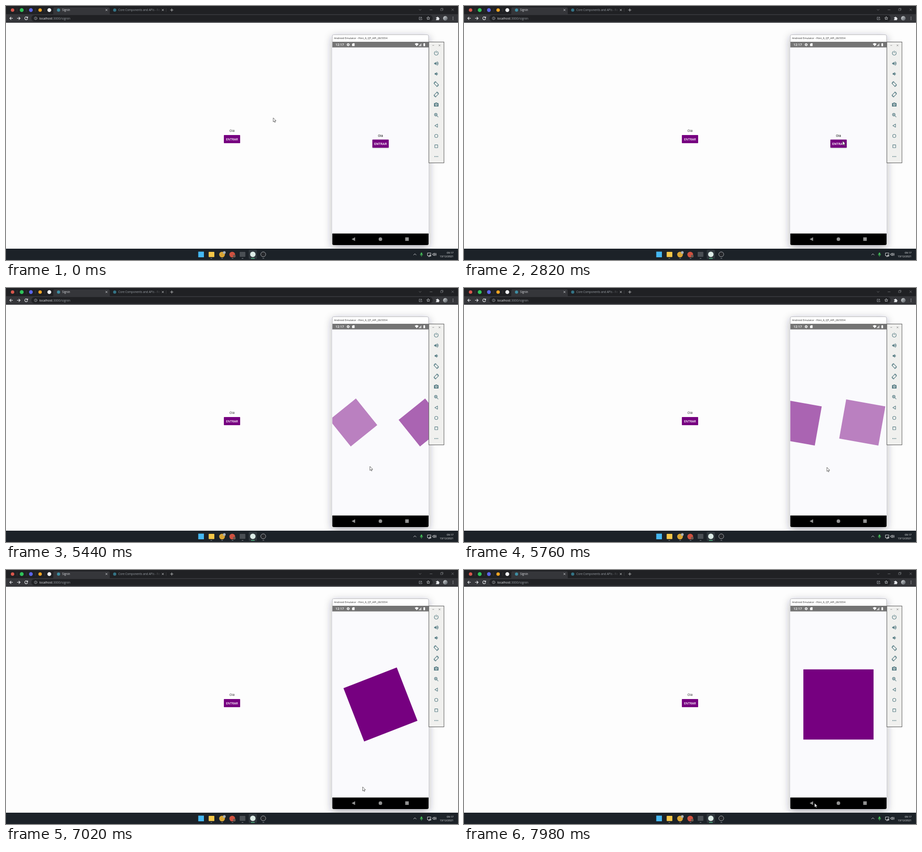
These frames come from a looping animation (998x561 px, 8000 ms). An HTML page:

```html
<!DOCTYPE html>
<html lang="pt-BR">
<head>
<meta charset="utf-8">
<title>Signin</title>
<style>
html, body { margin: 0; width: 100%; height: 100%; overflow: hidden; background: #fdfdfd; }
svg { display: block; width: 100vw; height: 100vh; }
text { font-family: "Open Sans", "Noto Sans", sans-serif; white-space: pre; }
.phone { font-family: Roboto, sans-serif; }
.line { fill: none; stroke-linecap: round; stroke-linejoin: round; }
</style>
</head>
<body>
<svg viewBox="0 0 998 561" xmlns="http://www.w3.org/2000/svg">
  <defs>
    <filter id="shadow" x="-30%" y="-20%" width="160%" height="140%">
      <feDropShadow dx="0" dy="5" stdDeviation="9" flood-color="#22223a" flood-opacity=".38"/>
    </filter>
    <filter id="lift" x="-20%" y="-30%" width="140%" height="180%">
      <feDropShadow dx="0" dy=".8" stdDeviation=".9" flood-opacity=".3"/>
    </filter>
    <linearGradient id="fade" gradientUnits="userSpaceOnUse" x1="322" x2="341" y1="0" y2="0">
      <stop stop-color="#9aa0a6"/><stop offset="1" stop-color="#9aa0a6" stop-opacity=".1"/>
    </linearGradient>
    <linearGradient id="avatar" x2="1" y2="1">
      <stop stop-color="#d5d8da"/><stop offset="1" stop-color="#50565c"/>
    </linearGradient>
    <clipPath id="screen"><rect x="720.5" y="92" width="212.5" height="410"/></clipPath>
  </defs>

  <!-- browser -->
  <rect width="998" height="561" fill="#fdfdfd"/>
  <rect width="998" height="19" fill="#202124"/>
  <path d="M102 18.500q2.500 0 2.500-3V6q0-3 3-3H226q3 0 3 3V15.500q0 3 2.500 3Z" fill="#35363a"/>
  <rect y="18" width="998" height="19" fill="#35363a"/>
  <rect x="56" y="20" width="886" height="14" rx="7" fill="#202124"/>
  <g id="pins"></g>
  <path d="M24.500 5v8M45 5v8M65 5v8M85.500 5v8M353.500 5v8" stroke="#4a4c50" stroke-width=".6"/>
  <circle cx="116" cy="9" r="3.500" fill="#3f8ea3"/>
  <circle cx="240" cy="9" r="3.500" fill="#347486"/>
  <text x="124" y="11.200" font-size="6.200" fill="#dfe1e5">Signin</text>
  <text x="248" y="11.200" font-size="6.250" fill="url(#fade)">Core Components and APIs - Re</text>
  <g class="line" stroke="#d5d7da" stroke-width=".9">
    <path d="M220 7l3.600 3.600m0-3.600L220 10.600M344.500 7l3.600 3.600m0-3.600l-3.600 3.600M363 8.900h6m-3-3v6"/>
    <g stroke="#85878a" stroke-width=".7">
      <path d="M912 7.500l2.300 2.200L916.600 7.500M936 8.500h5M984 6l4.500 4.500m0-4.500L984 10.500M961 6v-1h4v4h-1"/>
      <rect x="959.800" y="6.200" width="4" height="4"/>
    </g>
    <g stroke="#e4e6e9" stroke-width="1.200">
      <path d="M14.500 27.200H8.300m2.700-2.800l-2.800 2.800l2.800 2.800M25 27.200h6.200m-2.700-2.800l2.800 2.800l-2.800 2.800"/>
      <path d="M47.200 25.300A3.200 3.200 0 1 0 47.600 28.200M47.900 23.800v2.300h-2.400"/>
    </g>
    <g stroke="#aeb2b7" stroke-width=".8">
      <circle cx="65.500" cy="27.200" r="3"/>
      <path d="M65.500 27v1.700M65.500 25.500v.1"/>
      <path d="M914.500 24.600h-2.200v5.600h6v-1.800M914.500 28q.3-2.500 3-2.500m-1.200-1.500l2 1.500l-2 1.700"/>
      <path d="M932.300 23.600l1 2.300l2.500.2l-1.900 1.600l.6 2.400l-2.200-1.300l-2.200 1.300l.6-2.400l-1.900-1.600l2.500-.2Z" stroke="#e0e2e5"/>
    </g>
  </g>
  <path d="M949.500 25h2a1.300 1.300 0 1 1 2.600 0h1.800v2a1.300 1.300 0 1 1 0 2.600v1.600h-6.400v-2a1.300 1.300 0 1 0 0-2.600Z" fill="#e2e4e7"/>
  <circle cx="970" cy="27.200" r="5" fill="url(#avatar)"/>
  <path d="M987 24.500v.1m0 2.600v.1m0 2.600v.1" class="line" stroke="#e2e4e7" stroke-width="1.400"/>
  <text x="73.500" y="29.600" font-size="6.950" fill="#9aa0a6"><tspan fill="#e8eaed">localhost</tspan>:3000/signin</text>

  <text x="499" y="278.300" font-size="7.200" text-anchor="middle" fill="#222">Olá</text>
  <rect x="481" y="285" width="36" height="18" rx="1" fill="#760080"/>
  <text x="499" y="296.500" font-size="6.900" font-weight="600" text-anchor="middle" fill="#fff">ENTRAR</text>

  <!-- emulator window -->
  <path d="M720.500 66.500q0-3 3-3H930q3 0 3 3V525q0 3-3 3H723.500q-3 0-3-3Z" fill="#fff" filter="url(#shadow)"/>
  <path d="M720.500 79V66.500q0-3 3-3H930q3 0 3 3V79" fill="#fff" stroke="#8c8c92" stroke-width=".6"/>
  <text x="724.500" y="73.200" font-size="5.900" fill="#222">Android Emulator - Flint_6_QT_API_28:5554</text>
  <rect x="720.500" y="79" width="212.500" height="13" fill="#747474"/>
  <rect x="720.500" y="91.500" width="212.500" height="411" fill="#fafafd"/>
  <path d="M720.500 502.500H933V525q0 3-3 3H723.500q-3 0-3-3Z"/>
  <path d="M763.200 514.900l7.600-4.200v8.400ZM881.500 511h7.800v7.800h-7.800Z" fill="#929292"/>
  <circle cx="826.700" cy="514.900" r="3.900" fill="#929292"/>
  <text class="phone" x="727.500" y="88.200" font-size="7.300" font-weight="500" fill="#fff">12:17</text>
  <g fill="#fff">
    <circle cx="755.500" cy="85.400" r="1.900" fill="none" stroke="#fff" stroke-width="1.300"/>
    <circle cx="755.500" cy="85.400" r="2.900" fill="none" stroke="#fff" stroke-width=".9" stroke-dasharray="1.518"/>
    <path d="M766 82.200h3.600v6.400h-5.400v-4.600Z"/>
    <path d="M902.500 83.700q4.300-3.300 8.600 0l-4.300 5.100Z"/>
    <path d="M917.200 82.200v6.500h-6.500Z" opacity=".65"/>
    <path d="M921.700 82.800h1v-.8h1.600v.8h1v6h-3.600Z"/>
  </g>
  <g id="home">
    <text class="phone" x="826.700" y="288.700" font-size="7.500" text-anchor="middle" fill="#111">Olá</text>
    <rect x="809" y="295" width="36" height="18" rx="1" fill="#760080" filter="url(#lift)"/>
    <text class="phone" x="826.900" y="306.500" font-size="7.350" font-weight="500" text-anchor="middle" fill="#fff">ENTRAR</text>
  </g>
  <g id="box" clip-path="url(#screen)" fill="#760080">
    <rect id="echo" x="-31" y="-31" width="62" height="62"/>
    <rect id="main" x="-31" y="-31" width="62" height="62"/>
  </g>

  <!-- emulator side panel -->
  <rect x="933.700" y="79.500" width="33.300" height="267" fill="#f0f0ee" stroke="#3c3c3c" stroke-width=".9"/>
  <path d="M941.800 87h3M955.700 85.500l3 3m0-3l-3 3" class="line" stroke="#777" stroke-width=".8"/>
  <g class="line" stroke="#567c84" stroke-width="1.150">
    <path d="M947.500 100.700a4.300 4.300 0 1 0 5 0M950 99v4.500"/>
    <path d="M951.600 125.200q1.600 1.800 0 3.600M952.200 122.800q4.400 4.200 0 8.400"/>
    <path d="M952.200 148.200q1.500 1.700 0 3.400"/>
    <rect x="-2.600" y="-4.200" width="5.200" height="8.400" transform="translate(950 172.500) rotate(-45)"/>
    <path d="M945 171q.5-3.500 4-4.200M955 174q-.5 3.500-4 4.200"/>
    <rect x="-2.600" y="-4.200" width="5.200" height="8.400" transform="translate(950 195.500) rotate(45)"/>
    <path d="M955 194q-.5-3.500-4-4.200M945 197q.5 3.500 4 4.200"/>
    <circle cx="949" cy="240" r="2.900"/>
    <path d="M951.300 242.300l2.800 2.800M947.800 240h2.400M949 238.800v2.400"/>
    <path d="M946.800 264.200l6-3.500v7Z"/>
    <circle cx="950" cy="287" r="3.500"/>
    <rect x="946.800" y="306.600" width="6.400" height="6.400" rx=".6"/>
    <path d="M946.800 332.500h.1M950 332.500h.1M953.200 332.500h.1" stroke-width="1.900"/>
  </g>
  <g fill="#567c84">
    <path d="M945.500 125.400h2l2.800-2.400v8l-2.800-2.400h-2ZM946.500 148.300h2l2.800-2.400v8l-2.800-2.400h-2Z"/>
    <path fill-rule="evenodd" d="M945 214.500h2.500l1-1.300h3l1 1.300h2.500v7.500h-10ZM950 215.600a2.500 2.500 0 1 0 .01 0Z"/>
    <circle cx="950" cy="218.100" r="1.400"/>
  </g>

  <!-- taskbar -->
  <rect y="536" width="998" height="25" fill="#1c2228"/>
  <rect x="536" y="538.500" width="18" height="20" rx="2" fill="#30373d"/>
  <rect x="424.500" y="542.500" width="12.500" height="12.500" fill="#45b8f2"/>
  <rect x="447.500" y="543" width="12.500" height="11.500" rx="1" fill="#f6c748"/>
  <rect x="516" y="543" width="12.500" height="11" rx="1" fill="#4a4f54"/>
  <g id="apps"></g>
  <circle cx="568" cy="548.500" r="5.500" fill="#26282c" stroke="#b9bdc1" stroke-width=".9"/>
  <path d="M451.500 557.500h3.500M475.500 557.500h3.500M498.500 557.500h3.500M520.500 557.500h3.500M566.500 557.500h3.500" stroke="#8b9197" stroke-width="1.200"/>
  <path d="M541 557.500h8" stroke="#54c78c" stroke-width="1.500"/>
  <g class="line" stroke="#eceef0" stroke-width=".9">
    <path d="M900 550l2.800-2.800l2.800 2.800"/>
    <path d="M937 551.500h-6.500v-6h7.500v2.500M932.500 553.500h3M936.200 549.500h2v3h-2Z"/>
    <path d="M942.500 547.300h1.300l1.900-1.800v6.200l-1.900-1.800h-1.300ZM947.400 547q1.200 1.600 0 3.200M949 545.700q2.200 2.900 0 5.800"/>
    <g stroke="#46c05a">
      <rect x="916" y="545" width="2.600" height="4.600" rx="1.300" fill="#46c05a"/>
      <path d="M914.500 548.200q0 3 2.800 3t2.800-3M917.300 551.300v1.800"/>
    </g>
  </g>
  <g font-size="5.750" text-anchor="end" fill="#f4f5f6">
    <text x="988" y="546.800">09:17</text><text x="988" y="555">13/12/2021</text>
  </g>

  <path id="cursor" d="M0 0V9l2-1.900l1.300 3l1.500-.7L3.500 6.500H6.300Z" fill="#fff" stroke="#222" stroke-width=".7" stroke-linejoin="round"/>
</svg>
<script>
const LOOP = 8000, STEP = 20;
const CENTER = [826.8, 297];
const el = id => document.getElementById(id);
const clamp = v => Math.min(1, Math.max(0, v));
const ramp = (t, a, b) => clamp((t - a) / (b - a));
const smooth = u => u * u * (3 - 2 * u);
const rad = deg => deg * Math.PI / 180;

// Interpolates rows of [time, ...values]
function track(rows, t, ease = u => u) {
  const next = rows.findIndex(r => r[0] > t);
  if (next === 0) return rows[0].slice(1);
  if (next < 0) return rows[rows.length - 1].slice(1);
  const a = rows[next - 1], b = rows[next];
  const u = ease(ramp(t, a[0], b[0]));
  return a.slice(1).map((v, i) => v + (b[i + 1] - v) * u);
}

const pointer = [
  [0, 590, 247], [1680, 590, 247], [2000, 700, 234], [2380, 836, 298],
  [3340, 836, 298], [3600, 830.5, 311], [4660, 830.5, 311],
  [5240, 803.5, 394], [5640, 803.5, 394], [6000, 795, 402], [6420, 795, 402],
  [6960, 787.5, 479], [7300, 787.5, 479], [7860, 774, 515]
];
const growth = [[5000, 0], [5440, .142], [6160, .448], [7020, .691], [7960, 1]];

function dots(id, list) {
  el(id).innerHTML = list.map(([x, y, r, fill]) =>
    `<circle cx="${x}" cy="${y}" r="${r}" fill="${fill}"/>`).join('');
}
dots('pins', [
  [14.5, 9, 3.8, '#d9574c'], [34.7, 9, 4.3, '#2fc45a'], [55, 9, 4.2, '#5a64e8'],
  [75.3, 9, 3.8, '#f5a623'], [95.6, 9, 4.3, '#f2f3f4']
]);
dots('apps', [
  [477, 549, 6.3, '#d9a534'], [482, 544.5, 3, '#a9afb4'],
  [499.5, 549, 6.3, '#cf5140'], [504, 552.5, 3, '#6e5a50'],
  [545, 548.5, 6, '#dcebe6']
]);

function place(id, x, p, opacity) {
  el(id).setAttribute('transform',
    `translate(${CENTER[0] + x} ${CENTER[1]}) rotate(${360 * p}) scale(${1 + 1.5 * p})`);
  el(id).setAttribute('opacity', opacity);
}

function draw(t) {
  const shown = ramp(t, 3940, 4060);
  el('home').setAttribute('opacity', 1 - shown);
  el('box').setAttribute('opacity', shown);

  // Rapid sideways shake, blended with a trailing copy
  const [p] = track(growth, t);
  const since = t - 5440;
  const shaking = ramp(t, 4960, 5120) * (1 - ramp(t, 6180, 6420));
  const phase = 57.7 + since * 3.9228;
  const lag = 90.7 - since * .0286;
  const blend = shaking * Math.cos(Math.PI * since / 160) ** 2;
  const swing = deg => 110 * shaking * Math.sin(rad(deg));
  place('main', swing(phase), p, 1 - .4 * blend);
  place('echo', swing(phase - lag), p, .02 * shaking + .47 * blend);

  el('cursor').setAttribute('transform', `translate(${track(pointer, t, smooth)})`);
}

const start = performance.now();
function tick() {
  const t = (performance.now() - start) % LOOP;
  draw(Math.floor(t / STEP) * STEP);
  requestAnimationFrame(tick);
}
tick();
</script>
</body>
</html>
```
